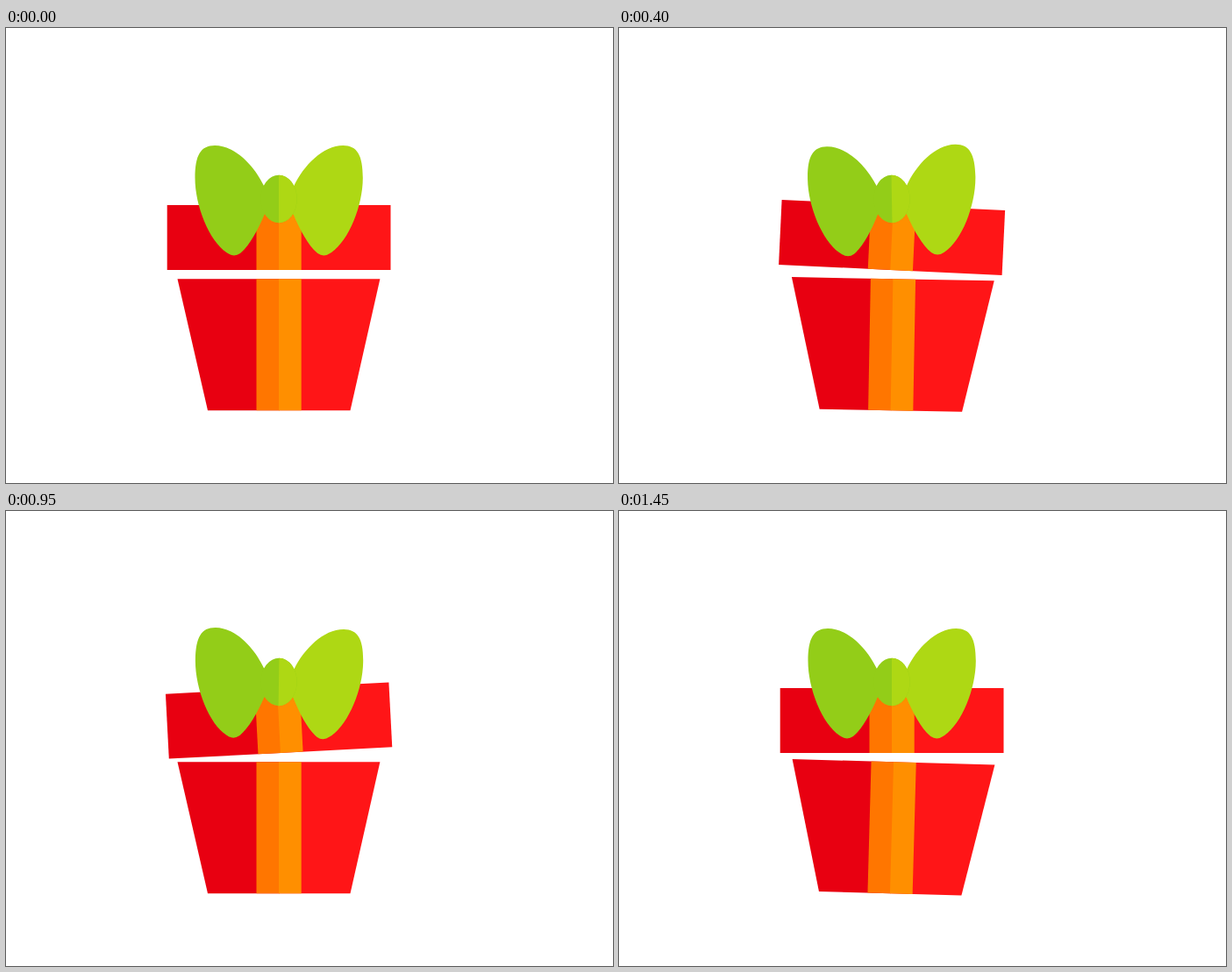
Recreate the animation shown at these times as an HTML page. Size 692x519 px, loop 1.5 s.

```html
<!DOCTYPE html>
<html lang="en">
<head>
<meta charset="utf-8">
<title>Gift box</title>
<style>
  html, body { margin: 0; width: 100%; height: 100%; overflow: hidden; background: #fff; }
  svg { display: block; width: 100vw; height: 100vh; }
</style>
</head>
<body>
<svg viewBox="0 0 692 519">
  <defs>
    <path id="lobe" d="M294 180C283 157 261 134 238 134C222 134 215.5 145 215.5 171C215.5 203 232 244 252.5 256.7Q260 262 267 257C277 249 287 231 294.5 213L305 205V190Z"/>
  </defs>
  <g id="base">
    <path fill="#e80011" d="M195.5 286.2H311V436.2H230Z"/>
    <path fill="#ff1517" d="M311 286.2H426.4L392.5 436.2H311Z"/>
    <path fill="#ff7600" d="M285.5 286.2H312V436.2H285.5Z"/>
    <path fill="#ff8f00" d="M311 286.2H336.7V436.2H311Z"/>
  </g>
  <g id="lid">
    <path fill="#e80011" d="M183.7 202H311V276H183.7Z"/>
    <path fill="#ff1517" d="M311 202H438.5V276H311Z"/>
    <path fill="#ff7600" d="M285.5 202H312V276H285.5Z"/>
    <path fill="#ff8f00" d="M311 202H336.7V276H311Z"/>
  </g>
  <g id="bow">
    <use href="#lobe" fill="#93cd18"/>
    <use href="#lobe" fill="#aed814" transform="translate(622.3 0) scale(-1 1)"/>
    <ellipse cx="311" cy="195" rx="20.7" ry="27.2" fill="#93cd18"/>
    <path fill="#aed814" d="M311 167.8A20.7 27.2 0 0 1 311 222.2Z"/>
  </g>
</svg>
<script>
  const CYCLE = 750, STEP = 50, SPAN = 500;

  // Each part swings about its own centre, one after the other.
  // A higher hold keeps the swing wide for longer before it dies out.
  const parts = [
    { id: "bow", y: 196, delay: 0, period: 365, swing: 3, hold: 4 },
    { id: "lid", y: 239, delay: 100, period: 375, swing: 3, hold: 6 },
    { id: "base", y: 361, delay: 250, period: 250, swing: 1.8, hold: 24 }
  ];
  for (const p of parts) p.node = document.getElementById(p.id);

  function angleAt(p, time) {
    const t = time - p.delay;
    if (t <= 0 || t >= SPAN) return 0;
    const fade = 1 - (t / SPAN) ** p.hold;
    return -p.swing * fade * Math.sin(2 * Math.PI * t / p.period);
  }

  function draw(ms) {
    const time = Math.floor(ms / STEP) * STEP % CYCLE;
    for (const p of parts)
      p.node.setAttribute("transform", `rotate(${angleAt(p, time).toFixed(3)} 311 ${p.y})`);
  }

  let start = null;
  function tick(now) {
    if (start === null) start = now;
    draw(now - start);
    requestAnimationFrame(tick);
  }
  draw(0);
  requestAnimationFrame(tick);
</script>
</body>
</html>
```
